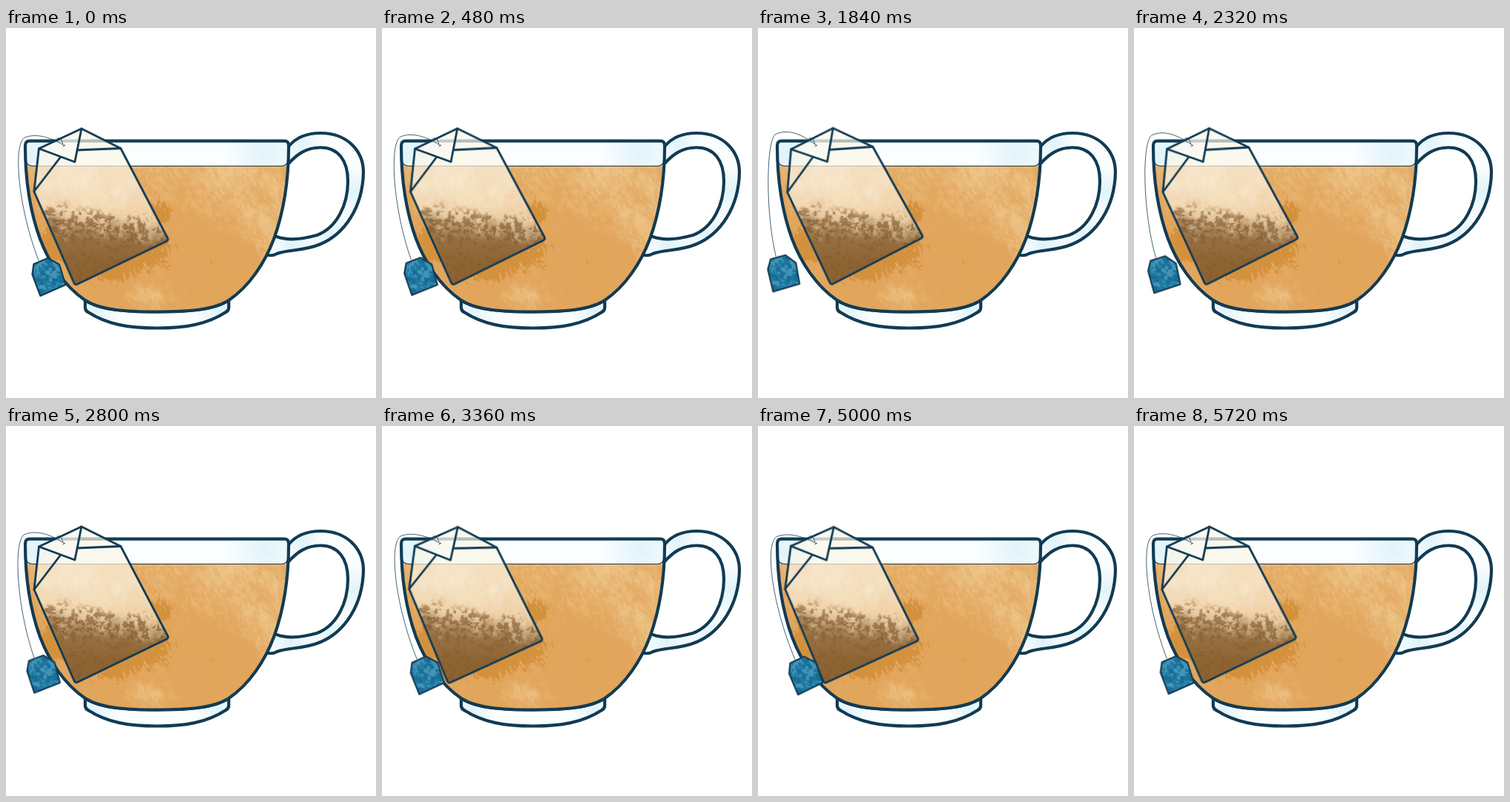
Recreate the animation shown at these times as an HTML page with a canvas. Size 500 by 500 pixels, loop 5.76 s.

```html
<!DOCTYPE html>
<html lang="en">
<head>
<meta charset="utf-8">
<title>Tea cup</title>
<style>
html, body { margin: 0; width: 100%; height: 100%; overflow: hidden; background: #fff; }
canvas { display: block; width: 100vw; height: 100vh; }
</style>
</head>
<body>
<canvas id="stage" width="500" height="500"></canvas>
<script>
const SIZE = 500, LOOP = 5760, INK = '#123b53';
const PIVOT = [78, 158];
const ctx = document.getElementById('stage').getContext('2d');

// Swing angles in degrees at each key time
const TIMES = [0, 960, 1840, 2800, 3360, 4280];
const BAG_SWING = [0.1, -0.9, -1.5, 0, 1.2, 2];
const TAG_SWING = [0, 3.7, 7.4, 2.3, -1.1, -3.3];

const clamp = v => Math.max(0, Math.min(1, v));
const mix = (a, b, k) => a + (b - a) * k;
const blend = (a, b, k) => a.map((v, i) => mix(v, b[i], k));
const smooth = (a, b, v) => { const k = clamp((v - a) / (b - a)); return k * k * (3 - 2 * k); };
const glow = (x, y, cx, cy, rx, ry) => Math.exp(-(((x - cx) / rx) ** 2) - ((y - cy) / ry) ** 2);

// Smooth periodic curve through the key angles
function swing(values, t) {
  const n = TIMES.length;
  const time = i => TIMES[(i + n) % n] + LOOP * Math.floor(i / n);
  const val = i => values[(i + n) % n];
  const slope = i => (val(i + 1) - val(i - 1)) / (time(i + 1) - time(i - 1));
  let i = n - 1;
  while (time(i) > t) i--;
  const h = time(i + 1) - time(i), u = (t - time(i)) / h, u2 = u * u, u3 = u2 * u;
  return (2 * u3 - 3 * u2 + 1) * val(i) + (u3 - 2 * u2 + u) * h * slope(i)
    + (3 * u2 - 2 * u3) * val(i + 1) + (u3 - u2) * h * slope(i + 1);
}

function hash(x, y) {
  let h = Math.imul(x, 374761393) + Math.imul(y, 668265263) | 0;
  h = Math.imul(h ^ (h >>> 13), 1274126177);
  return ((h ^ (h >>> 16)) >>> 0) / 4294967296;
}

function noise(x, y) {
  const ix = Math.floor(x), iy = Math.floor(y);
  const u = smooth(0, 1, x - ix), v = smooth(0, 1, y - iy);
  return mix(mix(hash(ix, iy), hash(ix + 1, iy), u),
    mix(hash(ix, iy + 1), hash(ix + 1, iy + 1), u), v);
}

function fbm(x, y, octaves = 4) {
  let sum = 0, amp = 0.5, total = 0;
  for (let i = 0; i < octaves; i++) {
    sum += amp * noise(x + 17 * i, y + 31 * i);
    total += amp;
    amp *= 0.6; x *= 2; y *= 2;
  }
  return sum / total;
}

function layer(paint) {
  const c = document.createElement('canvas');
  c.width = c.height = SIZE;
  paint(c.getContext('2d'));
  return c;
}

function texture(x0, y0, x1, y1, shade) {
  return layer(g => {
    const img = g.createImageData(x1 - x0, y1 - y0);
    let p = 0;
    for (let y = y0; y < y1; y++)
      for (let x = x0; x < x1; x++) {
        const [r, gr, b, a = 1] = shade(x, y);
        img.data[p++] = r; img.data[p++] = gr; img.data[p++] = b; img.data[p++] = a * 255;
      }
    g.putImageData(img, x0, y0);
  });
}

const PALE = [240, 206, 150], AMBER = [226, 165, 92], DEEP = [209, 141, 56];

function teaShade(x, y) {
  const u = x - y * 0.4;
  const wash = fbm(u / 50, y / 55), grain = fbm(u / 3.5 + 50, y / 6, 3);
  const light = 0.55 * glow(x, y, 290, 205, 130, 70) + 0.5 * glow(x, y, 80, 215, 90, 50)
    + 0.4 * glow(x, y, 200, 362, 40, 16) + 0.2 * glow(x, y, 340, 280, 35, 45);
  const dark = 0.62 * glow(x, y, 165, 312, 75, 38) + 0.35 * glow(x, y, 208, 245, 14, 28)
    + 0.4 * glow(x, y, 65, 295, 35, 35);
  const rough = (wash - 0.5) * 0.7 + (grain - 0.5) * 0.45;
  const c = blend(AMBER, PALE, 0.85 * smooth(0.08, 0.8, light + rough));
  return blend(c, DEEP, 0.85 * smooth(0.34, 0.44, dark - rough * 0.9));
}

const PAPER = [251, 245, 230], LEAF = [146, 108, 63], DUST = [112, 77, 42];

function bagShade(x, y) {
  const wash = fbm(x / 26 + 9, y / 26), grain = fbm(x / 5, y / 5 + 40, 3);
  const edge = 257 + (x - 130) * 0.1 + (wash - 0.5) * 36;
  const d = y - edge + (grain - 0.5) * 14;
  const paper = mix(0.7, 0.55, smooth(190, 265, y)) + (wash - 0.5) * 0.2 * smooth(165, 200, y);
  const body = smooth(-14, 32, d);
  const band = glow(0, d, 0, 8, 1, 20);
  const specks = smooth(0.54, 0.6, grain + band * 0.09 - 0.05) * smooth(-18, 4, d);
  const leaf = blend(LEAF, [137, 96, 48], smooth(285, 325, y));
  const c = blend(blend(PAPER, leaf, body), DUST, specks * mix(0.25, 0.65, band));
  return [...c, Math.max(mix(paper, 0.95, body), specks * 0.75)];
}

function tagShade(x, y) {
  const n = fbm(x / 5, y / 5 + 12, 3);
  const c = blend([31, 122, 162], [67, 148, 183], smooth(0.52, 0.58, n));
  return blend(c, [25, 108, 148], smooth(0.4, 0.35, n));
}

const path = d => new Path2D(d);
const FOOT = 'C279 382 241 383.500 204 383.500C166 383.500 129 382 107 368';
const CUP = path(`M32 152.500H376Q382 152.500 382 159C382 210 374 252 362 285C350 317 329 349 301 368${FOOT}C79 349 58 317 46 285C34 252 26 210 26 159Q26 152.500 32 152.500Z`);
const BASE = path(`M107 368V378Q107 382 111 384C137 401 167 405.500 204 405.500C241 405.500 271 401 297 384Q301 382 301 378V368${FOOT}Z`);
const RIM = path('M27 154H381V177Q381 186.500 372 186.500H36Q27 186.500 27 177Z');
const HANDLE_OUT = 'M382 160C391 149 406 142 425 142C462 142 483 167 483 195C482 242 458 278 425 292C401 302 381 299 366 305Q361 308 355 307';
const HANDLE_IN = '366 282C382 288 402 285 420 280C447 270 462 239 462 207C462 179 449 161.500 425 161.500C405 161.500 393 171 381 184';
const HANDLE = path(`${HANDLE_OUT}L${HANDLE_IN}Z`);
const HANDLE_LINES = path(`${HANDLE_OUT}M${HANDLE_IN}`);
const BAG = path('M102 136L155 162.500L218.500 283.500Q220 286.500 217 288L97 346Q93.500 347.500 92 344L38 221L44.500 163Z');
const FOLDS = path('M44.500 163L93 181L102 136M96 165L155 162.500M74 174L38 221');
const FLAP = path('M44.500 163L93 181L102 136Z');
const TAG = path('M37.500 319L56.500 311L72 319.500L80.500 347L46.500 362L35.500 333Z');

function stroke(g, shape, width) {
  g.strokeStyle = INK;
  g.lineWidth = width;
  g.lineJoin = 'round';
  g.lineCap = 'round';
  g.stroke(shape);
}

function fillWith(g, shape, image) {
  g.save();
  g.clip(shape);
  g.drawImage(image, 0, 0);
  g.restore();
}

function glass(g, shape, spots) {
  g.save();
  g.clip(shape);
  g.fillStyle = '#fbfeff';
  g.fillRect(0, 0, SIZE, SIZE);
  for (const [x, y, r] of spots) {
    const fade = g.createRadialGradient(x, y, 0, x, y, r);
    fade.addColorStop(0, '#e0f3fa');
    fade.addColorStop(1, 'rgba(224,243,250,0)');
    g.fillStyle = fade;
    g.fillRect(0, 0, SIZE, SIZE);
  }
  g.restore();
}

const tea = texture(20, 186, 388, 390, teaShade);
const leaves = texture(30, 130, 225, 352, bagShade);
const blue = texture(30, 305, 86, 368, tagShade);

const cup = layer(g => {
  g.fillStyle = '#fff';
  g.fillRect(0, 0, SIZE, SIZE);
  glass(g, HANDLE, [[400, 155, 32], [470, 222, 36], [385, 293, 36], [440, 280, 32]]);
  glass(g, BASE, [[120, 385, 35], [288, 382, 35]]);
  stroke(g, HANDLE_LINES, 4.2);
  stroke(g, BASE, 4.2);
  fillWith(g, CUP, tea);
  g.save();
  g.clip(CUP);
  g.fillStyle = '#fff';
  g.fillRect(20, 150, 370, 36.5);
  glass(g, RIM, [[40, 172, 55], [350, 168, 55]]);
  g.restore();
  stroke(g, RIM, 1.2);
  stroke(g, CUP, 4.2);
});

const bag = layer(g => {
  fillWith(g, BAG, leaves);
  g.fillStyle = 'rgba(255,255,255,.25)';
  g.fill(FLAP);
  stroke(g, BAG, 2.8);
  stroke(g, FOLDS, 2.8);
});

const tag = layer(g => {
  fillWith(g, TAG, blue);
  stroke(g, TAG, 2.2);
});

function drawTurned(image, deg) {
  ctx.save();
  ctx.translate(...PIVOT);
  ctx.rotate(deg * Math.PI / 180);
  ctx.translate(-PIVOT[0], -PIVOT[1]);
  ctx.drawImage(image, 0, 0);
  ctx.restore();
}

function turn(x, y, deg) {
  const a = deg * Math.PI / 180, dx = x - PIVOT[0], dy = y - PIVOT[1];
  return [PIVOT[0] + dx * Math.cos(a) - dy * Math.sin(a), PIVOT[1] + dx * Math.sin(a) + dy * Math.cos(a)];
}

function drawString(deg) {
  const k = (deg + 3.3) / 10.7;
  const [ex, ey] = turn(44, 314, deg);
  const top = mix(150, 144, k), side = mix(26, 23, k);
  const string = new Path2D();
  string.moveTo(80, 158);
  string.lineTo(77, 160);
  string.moveTo(79, 159);
  string.bezierCurveTo(65, mix(151, 147, k), 42, mix(144, 134, k), side, top);
  string.bezierCurveTo(mix(9, 11, k), mix(158, 156, k), mix(18, 10, k), mix(235, 250, k), ex, ey);
  string.moveTo(77, 157);
  string.quadraticCurveTo(75, 147, 69, 149);
  stroke(ctx, string, 0.8);
}

function frame(now) {
  const t = now % LOOP, tagDeg = swing(TAG_SWING, t);
  ctx.drawImage(cup, 0, 0);
  drawTurned(bag, swing(BAG_SWING, t));
  drawString(tagDeg);
  drawTurned(tag, tagDeg);
}

const start = performance.now();
function tick() {
  frame(performance.now() - start);
  requestAnimationFrame(tick);
}
tick();
</script>
</body>
</html>
```
